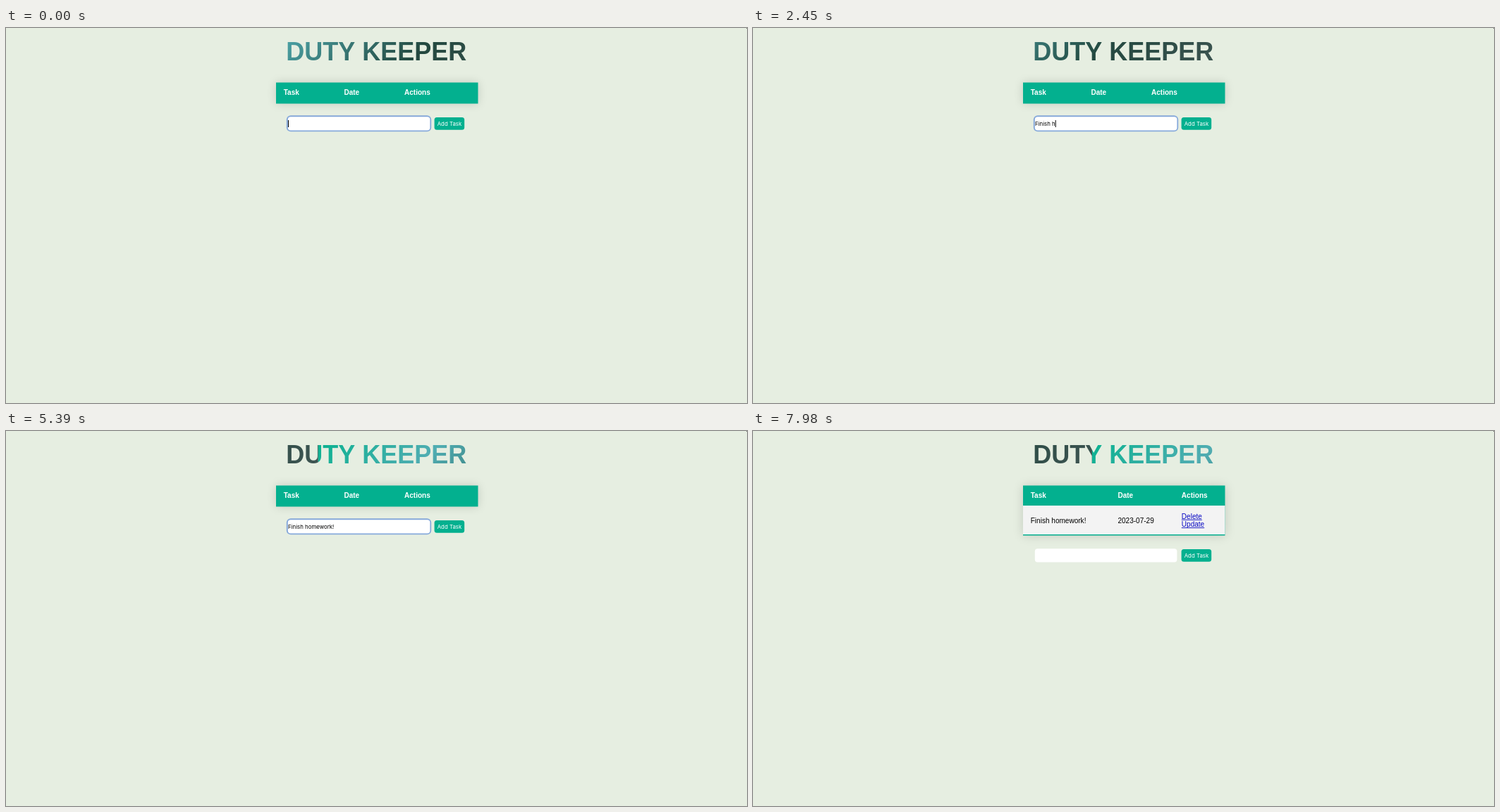
Write an HTML page with a canvas that moves like this. It is 1051 px wide and 533 px high and loops after 8000 ms.

```html
<!DOCTYPE html>
<html lang="en">
<head>
<meta charset="utf-8">
<title>Task list</title>
<style>
  html, body { margin: 0; width: 100%; height: 100%; overflow: hidden; background: #e6eee1; }
  canvas { display: block; }
</style>
</head>
<body>
<canvas id="stage" width="1051" height="533"></canvas>
<script>
const ctx = document.getElementById('stage').getContext('2d');
const LOOP = 8000, STEP = 70;
const BLUR_AT = 6090, RELOAD_AT = 6230;
const GREEN = '#03b08f';
const SANS = '"Liberation Sans", Arial, sans-serif';
const UI = '7.85px Inter, sans-serif';
const CELL = '10.05px ' + SANS;

const ENTRY = 'Finish homework!';
const KEY_TIMES = [770, 980, 1190, 1400, 1610, 1820, 2030, 2310,
                   2660, 2940, 3220, 3640, 3850, 4060, 4270, 4550];

// The heading gradient is a repeating tile, twice as wide as its box.
const TILE = { width: 573, top: 13.4, height: 41.4, period: 2100 };
const TILE_STOPS = [[0, '#08b28f'], [0.29, '#50adb2'], [0.67, '#23483f'], [1, '#3f5553']];

function text(str, x, y, font, color) {
  ctx.font = font;
  ctx.fillStyle = color;
  ctx.fillText(str, x, y);
}

function box(x, y, w, h, color, radius = 0) {
  ctx.fillStyle = color;
  ctx.beginPath();
  ctx.roundRect(x, y, w, h, radius);
  ctx.fill();
}

function link(str, x, y) {
  text(str, x, y, CELL, '#0a0ac4');
  ctx.fillRect(x, y + 1, ctx.measureText(str).width, 0.9);
}

function drawHeading(t) {
  const { width, top, height, period } = TILE;
  const start = t < RELOAD_AT ? 194.5 - width * t / period
                              : 383 - width * (t - RELOAD_AT - 9) / period;
  const d = (width + height) / 4;
  const cy = top + height / 2;
  let x = start % width;
  if (x > 0) x -= width;
  ctx.textAlign = 'center';
  for (; x < 700; x += width) {
    const cx = x + width / 2;
    const fill = ctx.createLinearGradient(cx - d, cy - d, cx + d, cy + d);
    TILE_STOPS.forEach(([at, color]) => fill.addColorStop(at, color));
    ctx.save();
    ctx.beginPath();
    ctx.rect(x, top, width, height);
    ctx.clip();
    text('DUTY KEEPER', 525.3, 45.9, 'bold 36px ' + SANS, fill);
    ctx.restore();
  }
  ctx.textAlign = 'left';
}

function drawTable(filled) {
  const left = 383, top = 77.5, width = 286.5;
  ctx.save();
  ctx.shadowColor = 'rgba(0,0,0,.15)';
  ctx.shadowBlur = 14;
  box(left, top, width, filled ? 71 : 30, GREEN);
  ctx.restore();
  const columns = filled ? [393.7, 517.4, 607.8] : [393.7, 479.4, 565];
  ['Task', 'Date', 'Actions'].forEach((label, i) =>
    text(label, columns[i], 95.4, 'bold ' + CELL, '#fff'));
  if (!filled) return;
  box(left, 106, width, 41, '#f3f3f3');
  text(ENTRY, columns[0], 130.5, CELL, '#000');
  text('2023-07-29', columns[1], 130.5, CELL, '#000');
  link('Delete', columns[2], 124.8);
  link('Update', columns[2], 136.2);
}

function drawForm(t, filled) {
  const y = filled ? 41 : 0;
  const focused = t < BLUR_AT;
  if (focused) box(397.8, 124.3, 205.4, 23, '#86a9da', 6);
  box(399.8, 126.2 + y, 201.6, 19.3, '#fff', 4);
  box(607.6, 127 + y, 42.6, 17.8, GREEN, 3.5);
  text('Add Task', 611.7, 138.9 + y, UI, '#fff');
  if (filled) return;

  const count = KEY_TIMES.filter(k => k <= t).length;
  const typed = ENTRY.slice(0, count);
  text(typed, 400, 138.9, UI, '#000');
  const idle = t - (count ? KEY_TIMES[count - 1] : 0);
  if (focused && idle % 1000 < 500) {
    ctx.fillRect(400 + ctx.measureText(typed).width, 131, 1, 10);
  }
}

function draw(now) {
  const t = Math.floor(now % LOOP / STEP) * STEP;
  const filled = t >= RELOAD_AT;
  box(0, 0, 1051, 533, '#e6eee1');
  box(1050, 0, 1, 1, '#6c706a');
  drawHeading(t);
  drawTable(filled);
  drawForm(t, filled);
}

const begin = performance.now();
function tick() {
  draw(performance.now() - begin);
  requestAnimationFrame(tick);
}
tick();
</script>
</body>
</html>
```
